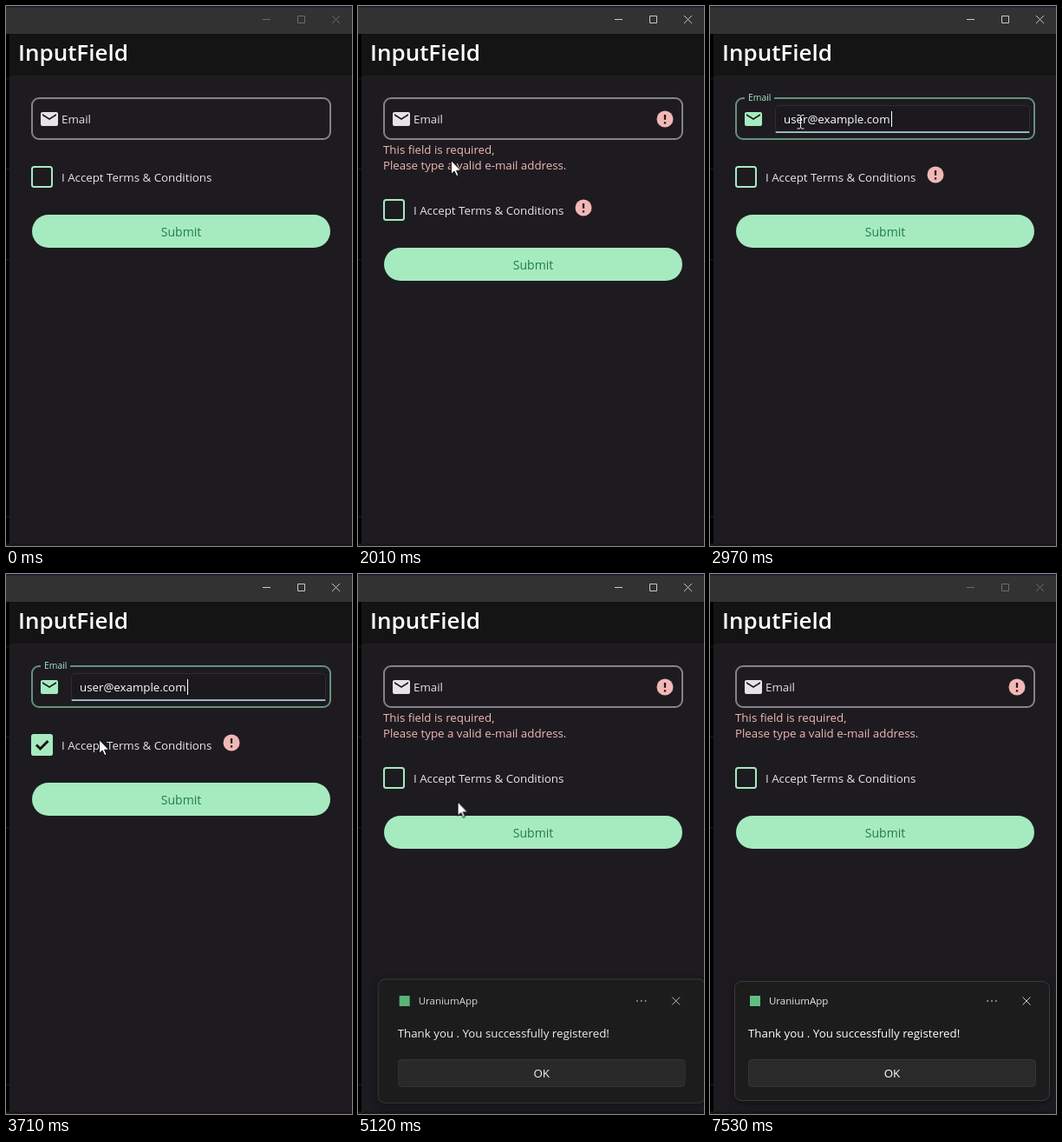
Write an HTML page that moves like this. It is 399 px wide and 621 px high and loops after 7660 ms.

```html
<!DOCTYPE html>
<html lang="en">
<head>
<meta charset="utf-8">
<title>InputField</title>
<style>
html, body { margin: 0; width: 100%; height: 100%; overflow: hidden; background: #1d1b20; }
svg { display: block; width: 399px; height: 621px; }
text, .value { font: 13.3px "Open Sans", "Noto Sans", sans-serif; fill: #e9e6ea; }
.value { color: #fff; line-height: 18px; white-space: nowrap; }
.mid { text-anchor: middle; }
.error { fill: #f2b8b5; }
.line { fill: none; stroke: #c8c8c8; }

/* Hard state changes */
.step { animation: 7.66s step-end infinite; }
.active { animation-name: active; }
.invalid { animation-name: invalid; }
.shift { animation-name: shift; }
.terms { animation-name: terms; }
.checked { animation-name: checked; }
.focus { animation-name: focus; }
.border { animation-name: border; }
.tint { animation-name: tint; }
.box { animation-name: box; }
.filled { animation-name: filled; }
.empty { animation-name: empty; }
.spell { animation-name: spell; text-decoration: underline wavy 1px transparent; text-underline-offset: 1px; text-decoration-skip-ink: none; }
.pointer { animation-name: pointer; }
.arrow { animation-name: arrow; }
.beam { animation-name: beam; }
.caret { display: inline-block; width: 1px; height: 18px; margin-left: 1px; background: #fff; vertical-align: top; }

@keyframes active { 0%, 98.29% { stroke: #6c6c6c } 14.74% { stroke: #c8c8c8 } }
@keyframes invalid { 0%, 38.76% { visibility: hidden } 16.57%, 62.39% { visibility: visible } }
@keyframes shift { 0%, 38.76% { transform: none } 16.57%, 62.39% { transform: translateY(38px) } }
@keyframes terms { 0%, 51.16% { visibility: hidden } 16.57% { visibility: visible } }
@keyframes checked { 0%, 62.39% { opacity: 0 } 47.64% { opacity: .6 } 48.42% { opacity: 1 } }
@keyframes focus { 0%, 51.16% { visibility: hidden } 29.88% { visibility: visible } }
@keyframes border { 0%, 51.16% { stroke: #858387 } 29.88% { stroke: #66917a } }
@keyframes tint { 0%, 51.16% { fill: #e6e3e7 } 29.88% { fill: #a6ebc0 } }
@keyframes box { 0%, 62.39% { width: 262px } 38.76% { width: 293px } }
@keyframes filled { 0%, 62.39% { visibility: hidden } 38.76% { visibility: visible } }
@keyframes empty { 0%, 38.76% { visibility: hidden } 29.88% { visibility: visible } }
@keyframes spell { 0%, 62.39% { text-decoration-color: transparent } 51.16% { text-decoration-color: #f00 } }
@keyframes pointer { 0%, 90.46% { visibility: hidden } 3.38% { visibility: visible } }
@keyframes arrow { 0%, 41.77% { opacity: 1 } 27.28% { opacity: 0 } }
@keyframes beam { 0%, 41.77% { opacity: 0 } 27.28% { opacity: 1 } }

/* Floating label */
.label { animation: label 7.66s ease-out infinite; }
.notch { animation: notch 7.66s ease-out infinite; transform-origin: 57px 0; }
@keyframes label {
  0%, 29.88%, 65.27%, 100% { transform: translate(64px, 135px) }
  32.64%, 62.39% { transform: translate(44px, 109px) scale(.78) }
}
@keyframes notch {
  0%, 29.88%, 65.27%, 100% { transform: scaleX(0) }
  32.64%, 62.39% { transform: none }
}

/* Dialog */
.dialog { animation: show 7.66s linear infinite; }
.frame { animation: zoom 7.66s ease-out infinite; transform-origin: 210px 537px; filter: drop-shadow(0 3px 6px #0006); }
.content { animation: slide 7.66s ease-out infinite; }
@keyframes show { 0%, 66.82% { opacity: 0 } 66.83% { opacity: .93 } 67.8%, 100% { opacity: 1 } }
@keyframes zoom { 0%, 66.83% { transform: translateX(2px) scale(1.04) } 69.5%, 100% { transform: none } }
@keyframes slide { 0%, 66.83% { transform: translateX(1.7px) } 69.5%, 100% { transform: none } }

/* Mouse path */
.move { animation: move 7.66s ease-in-out infinite; }
@keyframes move {
  0%, 3.38% { transform: translate(323px, 603px); animation-timing-function: ease-out }
  8.7% { transform: translate(111px, 274px) }
  10.44%, 19.2% { transform: translate(114px, 262px) }
  22.71%, 23.9% { transform: translate(119px, 343px); animation-timing-function: linear }
  26.23% { transform: translate(107px, 178px); animation-timing-function: ease-out }
  28.06%, 38.9% { transform: translate(104px, 133px) }
  45.82%, 50.4% { transform: translate(107px, 190px) }
  56.26%, 66.84% { transform: translate(114.5px, 261.5px); animation-timing-function: ease-in }
  69.58% { transform: translate(122px, 297px); animation-timing-function: ease-out }
  75.06%, 76.1% { transform: translate(199px, 537px) }
  77.8% { transform: translate(194px, 540px) }
  81.45%, 81.6% { transform: translate(218.5px, 555px) }
  85.11%, 87.8% { transform: translate(216px, 571px); animation-timing-function: linear }
  89.6%, 100% { transform: translate(290px, 599px) }
}
</style>
</head>
<body>
<svg viewBox="0 0 399 621">
  <defs>
    <g id="alert">
      <circle r="9.5" fill="#f2b8b5"/>
      <path d="M0-5V.8M0 3.2V5.4" stroke="#1d1b20" stroke-width="2.3"/>
    </g>
  </defs>

  <!-- Window -->
  <rect width="399" height="621" fill="#1d1b20"/>
  <rect width="399" height="32" fill="#323232"/>
  <rect width="399" height="1.5" fill="#1b1a33"/>
  <rect y="32" width="399" height="48" fill="#141414"/>
  <rect y="32" width="4" height="589" fill="#000"/>
  <path d="M0 83.5H4M0 187.5H4M0 291.5H4M0 587.5H4" stroke="#1c1c1c"/>
  <rect y="618" width="399" height="3" fill="#19151a"/>
  <path class="line step active" d="M296 15.5H305M336.5 11.5H344.5V19.5H336.5ZM376 11L385 20M385 11L376 20"/>
  <text x="14" y="63" style="font-size:26px;font-weight:600;fill:#fff">InputField</text>

  <!-- Email field -->
  <rect class="step border" x="30" y="106" width="344" height="47" rx="8" fill="none" stroke-width="2"/>
  <rect class="notch" x="40" y="103" width="34" height="6" fill="#1d1b20"/>
  <path class="step tint" transform="translate(38 118)" d="M20 4H4a2 2 0 0 0-2 2v12a2 2 0 0 0 2 2h16a2 2 0 0 0 2-2V6a2 2 0 0 0-2-2zm0 4-8 5-8-5V6l8 5 8-5z"/>
  <g class="step focus">
    <rect class="step box" x="75.5" y="114.5" height="31" rx="4" fill="#1b191d" stroke="#2e2c32"/>
    <rect class="step box" x="75.5" y="144.2" height="1.8" rx=".9" fill="#a9cbd8"/>
  </g>
  <rect class="step empty" x="85" y="121" width="1" height="18" fill="#fff"/>
  <foreignObject x="85" y="121" width="240" height="24">
    <div class="value step filled"><span class="step spell">user@example</span>.com<i class="caret step focus"></i></div>
  </foreignObject>
  <g class="label"><text class="step tint">Email</text></g>
  <g class="step invalid">
    <use href="#alert" x="354" y="130"/>
    <text class="error" x="29" y="170">This field is required,</text>
    <text class="error" x="29" y="188">Please type a valid e-mail address.</text>
  </g>

  <!-- Checkbox and button -->
  <g class="step shift">
    <rect x="30" y="185" width="23" height="23" rx="2.5" fill="none" stroke="#a6ebc0" stroke-width="2"/>
    <g class="step checked">
      <rect x="29" y="184" width="25" height="25" rx="3.5" fill="#a6ebc0"/>
      <path d="M35 196.5L39.5 201L48.5 192" fill="none" stroke="#111" stroke-width="3"/>
    </g>
    <text x="64" y="202">I Accept Terms &amp; Conditions</text>
    <g class="step terms"><use href="#alert" x="260" y="194"/></g>
    <rect x="30" y="240" width="344" height="38" rx="19" fill="#a6ebc0"/>
    <text class="mid" x="202" y="265" style="font-size:14px;fill:#217a4b">Submit</text>
  </g>

  <!-- Dialog -->
  <g class="dialog">
    <rect class="frame" x="28.5" y="468.5" width="363" height="137" rx="8" fill="#1c1c1c" stroke="#3b3b3b"/>
    <g class="content">
      <rect x="46" y="485" width="12" height="12" fill="#5fbf80"/>
      <text x="68" y="495" style="font-size:11.5px">UraniumApp</text>
      <path d="M319.5 491H321M324.3 491H325.8M329.1 491H330.6" stroke="#c8c8c8" stroke-width="1.5"/>
      <path class="line" d="M360.5 486.5L369.5 495.5M369.5 486.5L360.5 495.5"/>
      <text x="44" y="533" style="fill:#fff">Thank you . You successfully registered!</text>
      <rect x="44.5" y="558.5" width="331" height="31" rx="4" fill="#2a2a2a" stroke="#363636"/>
      <text class="mid" x="210" y="579" style="fill:#fff">OK</text>
    </g>
  </g>

  <!-- Mouse -->
  <g class="step pointer">
    <g class="move">
      <path class="step arrow" d="M.5.5V16.5L4.2 13L6.7 18.6L9 17.6L6.6 12.2H11.7Z" fill="#fff" stroke="#000" stroke-width=".9"/>
      <path class="step beam" d="M-3.5-7.5H-1L.5-6.5L2-7.5H4.5M.5-6.5V7M-3.5 8H-1L.5 7L2 8H4.5" fill="none" stroke="#e8e8e8"/>
    </g>
  </g>
</svg>
</body>
</html>
```
